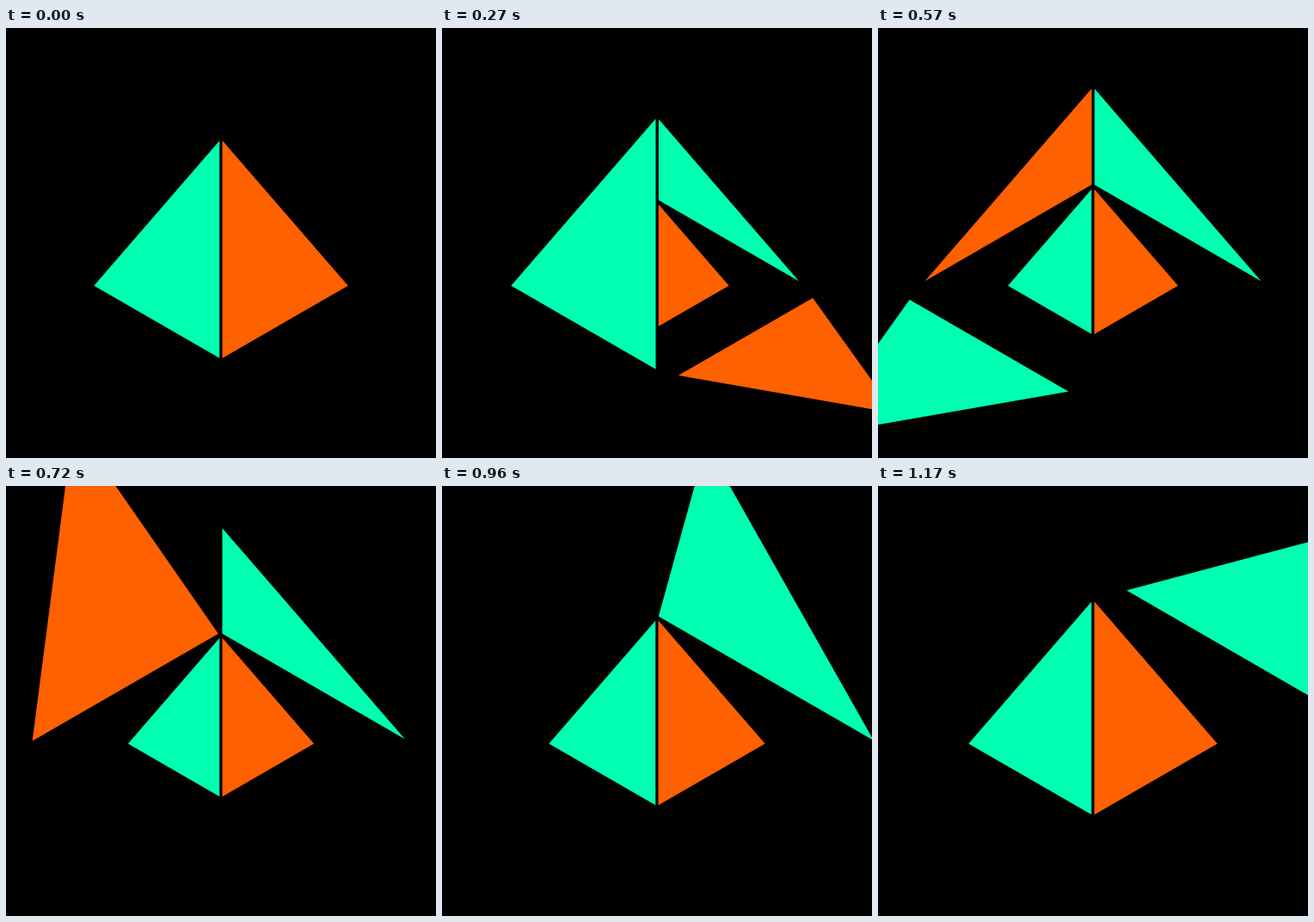
An HTML page with a canvas for the animation above (1200 ms loop, 500 by 500 pixels).

```html
<!DOCTYPE html>
<html lang="en">
<head>
<meta charset="utf-8">
<title>Unfolding pyramids</title>
<style>
  html, body { margin: 0; height: 100%; overflow: hidden; background: #000; }
  canvas { display: block; }
</style>
</head>
<body>
<canvas width="500" height="500"></canvas>
<script>
const ctx = document.querySelector('canvas').getContext('2d');
const LOOP = 1200, STEPS = 40;
const ORANGE = '#ff6000', MINT = '#00ffb0';

// Pyramid with a square base and height equal to its side, in isometric view
const HALF = Math.SQRT2, SLANT = Math.sqrt(10);
const CLOSED = Math.PI - Math.atan(2);
const KX = Math.SQRT1_2, KY = 1 / Math.sqrt(6), KZ = Math.sqrt(2 / 3);

ctx.lineWidth = 3;
ctx.lineJoin = 'round';
ctx.strokeStyle = '#000';

// One side face; sx and sy pick the side, open (0..1) tips it outward on its base edge
function drawFace(sx, sy, size, open = 0) {
  const p = Math.max(0, open);
  const angle = CLOSED * (1 - p * p * (3 - 2 * p));
  const scale = 1 - 0.097 * p ** 4;
  const hinge = HALF + 0.378 * p ** 4;
  const half = HALF * scale, slant = SLANT * scale;
  const point = (out, along, z) => ctx.lineTo(
    250 + size * sx * KX * (out + along),
    300 + size * (sy * KY * (out - along) - KZ * z));

  ctx.beginPath();
  point(hinge, -half, 0);
  point(hinge, half, 0);
  point(hinge + slant * Math.cos(angle), 0, slant * Math.sin(angle));
  ctx.closePath();
  ctx.fillStyle = sx === sy ? ORANGE : MINT;
  ctx.fill();
  ctx.stroke();
}

function draw(u) {
  const size = 75 / (1 - (1 - Math.SQRT1_2) * u) ** 2;
  const outerFace = (sx, sy, turn) => {
    const open = u * 4 - turn;
    if (open < 1) drawFace(sx, sy, size, open);
  };
  ctx.fillStyle = '#000';
  ctx.fillRect(0, 0, 500, 500);
  outerFace(1, -1, 3);
  outerFace(-1, -1, 2);
  drawFace(-1, 1, size / 2);
  drawFace(1, 1, size / 2);
  outerFace(-1, 1, 1);
  outerFace(1, 1, 0);
}

function tick() {
  const step = Math.floor(performance.now() / LOOP * STEPS + 0.05);
  draw(step % STEPS / STEPS);
  requestAnimationFrame(tick);
}
tick();
</script>
</body>
</html>
```
